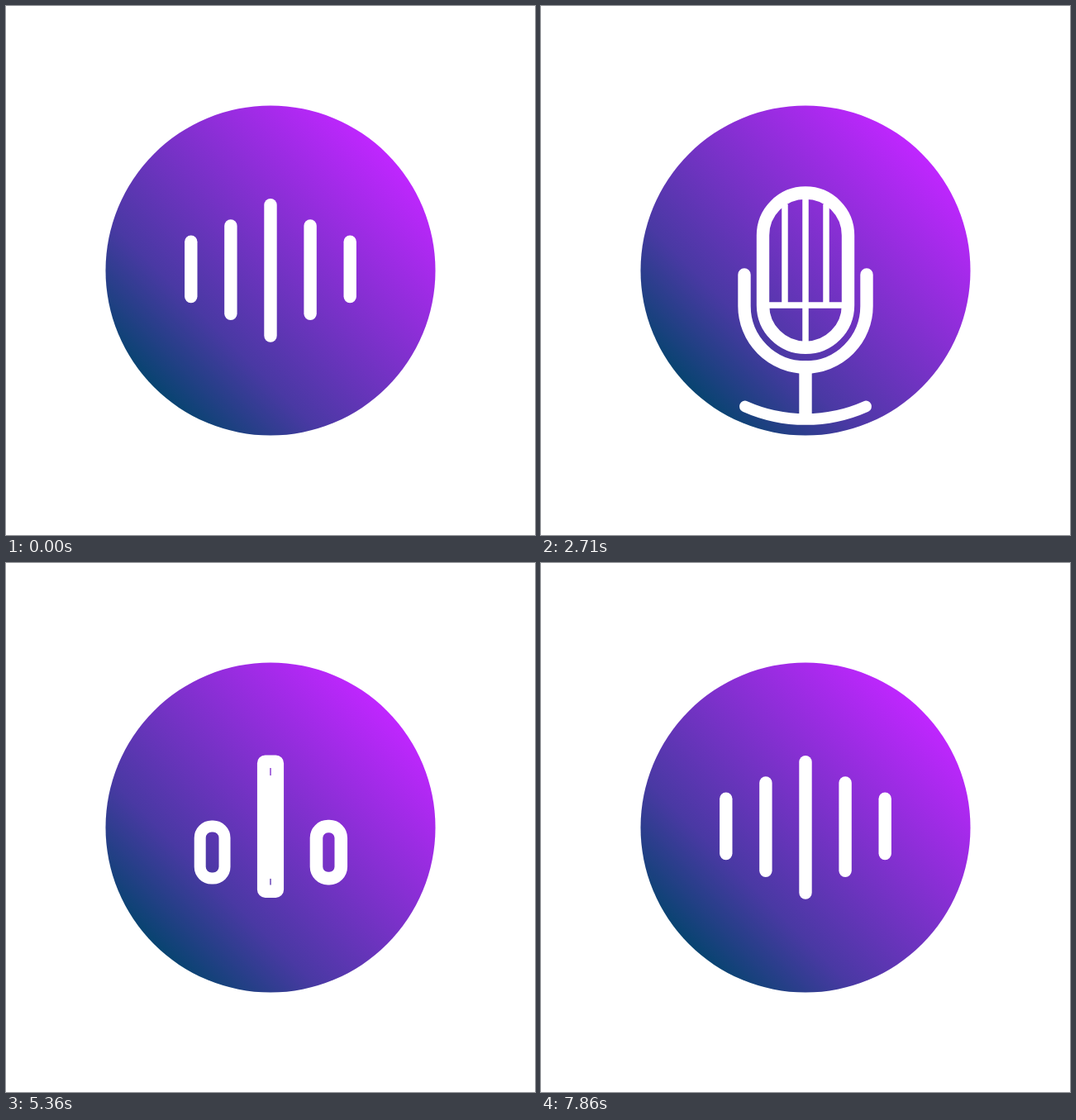
Recreate the animation shown at these times as an HTML page with a canvas. Size 640x640 px, loop 8000 ms.

```html
<!DOCTYPE html>
<html lang="en">
<head>
<meta charset="utf-8">
<title>Audio icons</title>
<style>
  html, body { margin: 0; width: 100%; height: 100%; overflow: hidden; background: #fff; }
  canvas { display: block; width: 100vmin; height: 100vmin; margin: 0 auto; }
</style>
</head>
<body>
<canvas id="stage" width="640" height="640"></canvas>
<script>
const ctx = document.getElementById('stage').getContext('2d');
const { PI, sin, cos, min, max, abs, floor } = Math;
const LOOP = 8000, FPS = 14, C = 320, STROKE = 15.4;
let T = 0;

// Progress of a time span: even, smooth, with a small overshoot, there and back
const span = (a, b) => min(1, max(0, (T - a) / (b - a)));
const go = (a, b) => { const u = span(a, b); return u * u * (3 - 2 * u); };
const settle = (a, b) => { const u = span(a, b) - 1; return 1 + 1.9 * u ** 3 + 0.9 * u * u; };
const hop = (a, b) => sin(PI * span(a, b));
const out = (u, power) => 1 - (1 - u) ** power;
const during = (a, b) => T >= a && T < b;

const lerp = (a, b, u) => a + (b - a) * u;
function mix(a, b, u) {
  const pose = {};
  for (const key in a) pose[key] = lerp(a[key], b[key], u);
  return pose;
}

function stroke(width, cap = 'round') {
  if (width < 0.1) return;
  ctx.lineWidth = width;
  ctx.lineCap = cap;
  ctx.stroke();
}

function line(x1, y1, x2, y2, width, cap) {
  ctx.beginPath();
  ctx.moveTo(x1, y1);
  ctx.lineTo(x2, y2);
  stroke(width, cap);
}

function pill(cx, cy, w, h, r, width) {
  w = max(w, 0.1);
  h = max(h, 0.1);
  ctx.beginPath();
  ctx.roundRect(cx - w / 2, cy - h / 2, w, h, max(0, min(r, w / 2, h / 2)));
  stroke(width);
}

function ring(x, y, inner, width) {
  ctx.beginPath();
  ctx.arc(x, y, inner + width / 2, 0, PI * 2);
  stroke(width);
}

// Strokes only the first part of the current path
function trim(length, part) {
  if (part <= 0) return;
  ctx.setLineDash(part < 1 ? [length * part, length * 2] : []);
  stroke(STROKE);
  ctx.setLineDash([]);
}

function disc() {
  const g = ctx.createLinearGradient(170, 470, 462, 178);
  g.addColorStop(0, '#00456a');
  g.addColorStop(0.28, '#4939a3');
  g.addColorStop(1, '#c026ff');
  ctx.fillStyle = g;
  ctx.beginPath();
  ctx.arc(C, C, 199.5, 0, PI * 2);
  ctx.fill();
}

// Bar poses by distance d from the middle bar
const tall = d => ({ dx: 48.1 * d, cy: 319.8 - 0.7 * d, half: 79.2 - 29 * d + 3 * d * d, line: STROKE });
const low = d => ({ dx: 48.1 * d, cy: 320.9, half: 26.7 + 1.5 * d, line: STROKE });
const small = d => ({ dx: 18 * d + 2 * d * d, cy: 359 - 7.6 * d + 3.1 * d * d, half: 18 + 1.5 * d - 0.3 * d * d, line: 8 });
const MIC_BARS = [
  { dx: 0, cy: 319.7, half: 86, line: 7.5 },
  { dx: 25, cy: 301, half: 61, line: 7.5 },
  { dx: 74, cy: 344, half: 19, line: STROKE }
];

function bars(poseOf) {
  for (let i = -2; i <= 2; i++) {
    const p = poseOf(abs(i));
    const x = C + Math.sign(i) * p.dx;
    line(x, p.cy - p.half, x, p.cy + p.half, p.line);
  }
}

// Bounces, then turns into the grill and the sides of the holder
function equalizer() {
  const u = span(0, 1000), m = go(900, 1650);
  bars(d => {
    const height = (1 + cos(3 * PI * u - 0.7 * d * sin(PI * u))) / 2;
    return mix(mix(low(d), tall(d), height), MIC_BARS[d], m);
  });
}

// Bounces between the cups, then grows back to the tall bars
function smallBars() {
  const spread = go(5429, 5786), grow = go(7500, 7857);
  const wave = (1 - cos((T - 6071) / 714.3 * PI * 2)) / 2;
  bars(d => {
    const p = small(d);
    p.dx *= spread;
    p.half += (22 - 7.5 * d) * wave * spread;
    return mix(p, tall(min(d, 1)), grow);
  });
}

// One outline: microphone body, cassette case, upright post, small bar
const SEED = { w: 0, top: 320, bottom: 320, r: 0, line: 0 };
const MORPHS = [
  [1357, 1714, { w: 103, top: 226, bottom: 413.4, r: 51.5, line: STROKE }],
  [2929, 3429, { w: 187, top: 265.2, bottom: 374.6, r: 2, line: STROKE }],
  [4286, 4786, { w: 16.8, top: 240, bottom: 397.3, r: 2, line: STROKE }],
  [5357, 5643, { w: 0, top: 341, bottom: 377, r: 0, line: 8 }]
];

function body(dy) {
  const p = MORPHS.reduce((pose, [a, b, next]) => mix(pose, next, settle(a, b)), SEED);
  const top = p.top - 66 * hop(4286, 4786);
  pill(C, (top + p.bottom) / 2 + dy, p.w, p.bottom - top, p.r, p.line);
}

function grill(dy) {
  const fold = 1 - go(2786, 3071), y = 362 + dy;
  if (fold <= 0) return;
  for (const x of [C - 25, C + 25]) line(x, y, x, y - 122 * fold, 7.5, 'butt');
  line(C, y - 130 * fold, C, y + 44 * fold, 7.5, 'butt');
}

// Cross line of the grill that becomes the window of the cassette
function crossLine(dy) {
  const m = go(3000, 3429), size = go(1643, 1857) - go(4286, 4500);
  const y = lerp(362, 289, m) + dy;
  const half = lerp(46, 57, m) * size, bevel = go(3286, 3500) * size;
  ctx.beginPath();
  ctx.moveTo(C - half - 14 * bevel, y - 17 * bevel);
  ctx.lineTo(C - half, y);
  ctx.lineTo(C + half, y);
  ctx.lineTo(C + half + 14 * bevel, y - 17 * bevel);
  ctx.lineJoin = 'miter';
  stroke(size > 0 ? 7.6 : 0, 'butt');
  ctx.lineJoin = 'round';
}

function holder() {
  const rx = 74 + 30 * hop(1714, 2214);
  const part = lerp(0.22, 1, go(1714, 2143)) - go(2786, 3071);
  for (const side of [-1, 1]) {
    ctx.beginPath();
    ctx.moveTo(C + side * rx, 325);
    ctx.lineTo(C + side * rx, 363);
    ctx.ellipse(C, 363, rx, 74, 0, side < 0 ? PI : 0, PI / 2, side < 0);
    trim(38 + (rx + 74) * PI / 4, part);
  }
  const top = 437 + 62 * go(2857, 3071), end = 437 + 62 * go(2071, 2286);
  if (end > top) line(C, top, C, end, STROKE, 'butt');
}

// Foot of the microphone: swings back, then whips once around the disc
function foot() {
  const u = span(2786, 3429), v = span(3429, 4071);
  const half = 24 * go(2214, 2500);
  const swing = 160 * u ** 11 - 14 * sin(PI * u);
  const head = half + swing + 176 * out(v, 3.7);
  const tail = -half + swing + 224 * out(v, 2.44);
  if (head - tail < 0.3) return;
  const rad = a => PI / 2 - a * PI / 180;
  ctx.beginPath();
  ctx.arc(C, C, 180, rad(head), rad(tail));
  stroke(13.6);
}

function spools() {
  const size = go(3214, 3500) - go(4286, 4500), wind = hop(3429, 4286);
  if (size <= 0) return;
  ring(282.6, 326.8, 12.8 * size, lerp(15.3, 8.1, wind) * size);
  ring(357.2, 326.8, 12.8 * size, lerp(8.1, 15.3, wind) * size);
}

// Leave the post, sit beside the head, then close up into the outer bars
function cups() {
  const u = span(5000, 5714), open = out(u, 2.65), shut = go(7500, 7857);
  const end = tall(2);
  for (const side of [-1, 1]) {
    const thick = span(5000 - 20 * (1 + side), 5536 - 20 * (1 + side));
    const cup = { dx: 83.7 * open, cy: lerp(303, 359, open), w: 27.3 + 2.5 * sin(PI * u), h: 75 * open, line: 21 * thick };
    const p = mix(cup, { dx: end.dx, cy: end.cy, w: 0, h: end.half * 2, line: STROKE }, shut);
    pill(C + side * p.dx, p.cy, p.w, p.h, 14, p.line);
  }
}

function headband() {
  const r = 117.2, part = go(5429, 5786) - go(7500, 7786);
  for (const side of [-1, 1]) {
    ctx.beginPath();
    ctx.moveTo(C + side * r, 361.5);
    ctx.arc(C, C, r, side < 0 ? PI : 0, -PI / 2, side > 0);
    trim(41.5 + r * PI / 2, part);
  }
}

function draw() {
  ctx.clearRect(0, 0, 640, 640);
  disc();
  ctx.strokeStyle = '#fff';
  ctx.lineJoin = 'round';
  const dy = -58 * hop(1714, 2286);
  if (T < 1700) equalizer();
  if (during(1357, 5643)) body(dy);
  if (during(1643, 4500)) crossLine(dy);
  if (during(1700, 3071)) {
    grill(dy);
    holder();
  }
  if (during(2214, 4071)) foot();
  if (during(3214, 4500)) spools();
  if (during(4700, 5429)) line(C, 261, C, 378, 8);
  if (T > 5010) cups();
  if (T > 5430) {
    headband();
    smallBars();
  }
}

function tick(now) {
  // Moves in even steps and rests on the opening pose at the end
  const step = floor((now % LOOP + 4) * FPS / 1000);
  T = step < 110 ? step * 1000 / FPS : 0;
  draw();
  requestAnimationFrame(tick);
}
tick(performance.now());
</script>
</body>
</html>
```
